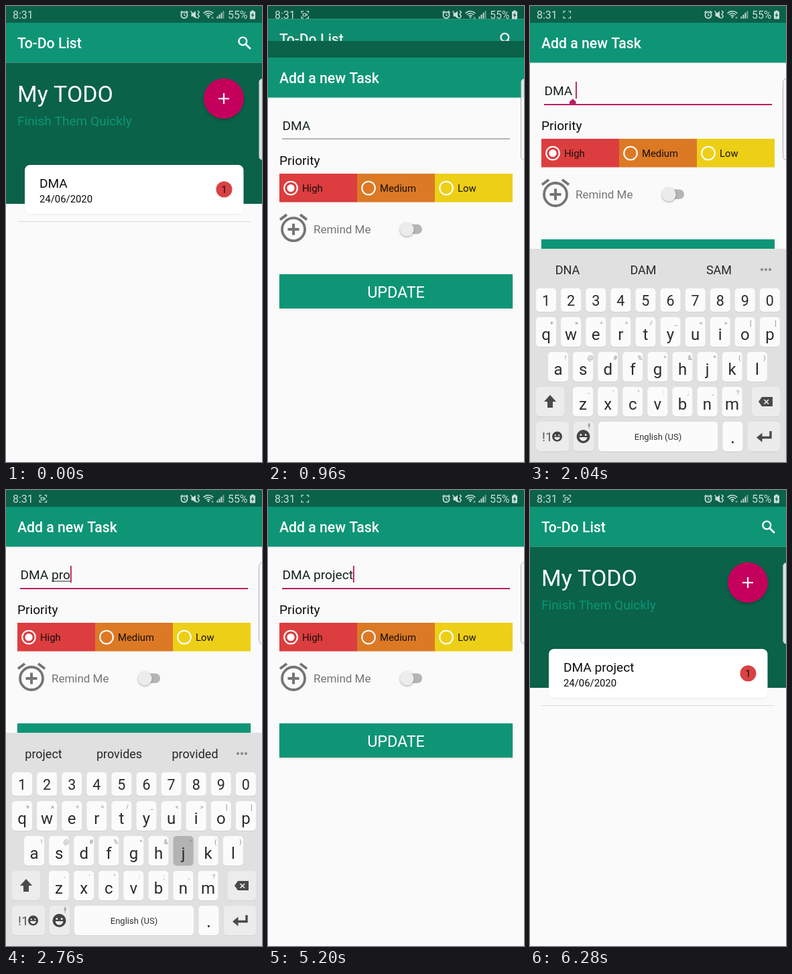
Write an HTML page with a canvas that moves like this. It is 382 by 680 pixels and loops after 6320 ms.

```html
<!DOCTYPE html>
<html lang="en">
<head>
<meta charset="utf-8">
<title>To-Do List</title>
<style>
  html, body { margin: 0; width: 100%; height: 100%; overflow: hidden; background: #fafafa; }
  canvas { display: block; width: 382px; height: 680px; }
</style>
</head>
<body>
<canvas id="stage"></canvas>
<script>
const W = 382, H = 680, LOOP = 6320, STEP = 40;
const DARK = '#0a6249', GREEN = '#0e9576', PAPER = '#fafafa', PINK = '#c5005c', ACCENT = '#b91f5f';
const canvas = document.getElementById('stage');
const dpr = window.devicePixelRatio || 1;
canvas.width = W * dpr;
canvas.height = H * dpr;
const c = canvas.getContext('2d');

// Key presses: label, press time, release time, time the character lands
const PRESSES = [
  [' ', 1960, 2040, 2000], ['p', 2120, 2240, 2200], ['r', 2280, 2400, 2360],
  ['o', 2440, 2560, 2520], ['j', 2720, 2880, 2840], ['e', 3120, 3320, 3320],
  ['c', 3400, 3520, 3480], ['t', 3560, 3640, 3640]
];
const FOCUS = 1320, COMMIT = 3840, OPEN = 780, CLOSE = 5225, SLIDE = 425;
const REC_TOGGLES = [560, 1040, 1480, 1960, 2440, 2920, 3360, 3880, 4400, 4880, 5320, 5760, 6280];
const HINTS = {
  'DMA': 'DNA DAM SAM',
  'DMA ': 'DNA DAM SAM',
  'DMA p': 'project please people',
  'DMA pr': 'project pretty present',
  'DMA pro': 'project provides provided',
  'DMA proj': 'project projects projected',
  'DMA proje': 'project projects projected',
  'DMA projec': 'project projects projected',
  'DMA project': 'projects projections projected'
};
const ROWS = [
  { y: 421, h: 35, x: 24, keys: '1234567890', alt: '' },
  { y: 464, h: 44, x: 24, keys: 'qwertyuiop', alt: '+×÷=/_<>[]' },
  { y: 516, h: 44, x: 42, keys: 'asdfghjkl', alt: '!@#%^&*()' },
  { y: 568, h: 44, x: 79, keys: 'zxcvbnm', alt: '-\'":;,?' }
];

const clamp = v => Math.max(0, Math.min(1, v));
const progress = (t, start, len) => clamp((t - start) / len);
const easeOut = p => 1 - Math.pow(1 - p, 3);
const cubic = (s, a, b, d, e) => {
  const r = 1 - s;
  return r * r * r * a + 3 * r * r * s * b + 3 * r * s * s * d + s * s * s * e;
};

// Fast start with a very long settle, made of two Bezier pieces
function slideEase(x) {
  if (x <= 0) return 0;
  if (x >= 1) return 1;
  const [px, py] = x < 1 / 6
    ? [[0, 0.05, 0.1333, 1 / 6], [0, 0, 0.06, 0.4]]
    : [[1 / 6, 0.2083, 0.25, 1], [0.4, 0.82, 1, 1]];
  let lo = 0, hi = 1;
  for (let i = 0; i < 30; i++) {
    const mid = (lo + hi) / 2;
    if (cubic(mid, ...px) < x) lo = mid; else hi = mid;
  }
  return cubic(lo, ...py);
}

function rect(x, y, w, h, color) {
  c.fillStyle = color;
  c.fillRect(x, y, w, h);
}
function round(x, y, w, h, r, color) {
  c.beginPath();
  c.roundRect(x, y, w, h, r);
  c.fillStyle = color;
  c.fill();
}
function disc(x, y, r, color) {
  c.beginPath();
  c.arc(x, y, r, 0, 7);
  c.fillStyle = color;
  c.fill();
}
function ring(x, y, r, width, color) {
  c.beginPath();
  c.arc(x, y, r, 0, 7);
  c.lineWidth = width;
  c.strokeStyle = color;
  c.stroke();
}
function trace(points) {
  c.beginPath();
  for (let i = 0; i < points.length; i += 2) c.lineTo(points[i], points[i + 1]);
}
function line(points, width, color) {
  trace(points);
  c.lineWidth = width;
  c.strokeStyle = color;
  c.stroke();
}
function poly(points, color) {
  trace(points);
  c.closePath();
  c.fillStyle = color;
  c.fill();
}
function text(str, x, y, size, color, align = 'left', weight = 400) {
  c.font = `${weight} ${size}px Roboto, sans-serif`;
  c.textAlign = align;
  c.fillStyle = color;
  c.fillText(str, x, y);
}
function withShadow(blur, dy, alpha, draw) {
  c.save();
  c.shadowColor = `rgba(0,0,0,${alpha})`;
  c.shadowBlur = blur * dpr;
  c.shadowOffsetY = dy * dpr;
  draw();
  c.restore();
}

function typed(t) {
  return 'DMA' + PRESSES.filter(p => t >= p[3]).map(p => p[0]).join('');
}
function caretOn(t) {
  const marks = [FOCUS, ...PRESSES.map(p => p[3]), 3880].filter(m => m <= t);
  return marks.length > 0 && (t - marks[marks.length - 1]) % 1000 < 500;
}

function appBar(title) {
  rect(0, 0, W, H, PAPER);
  rect(0, 84, W, 2, '#ececec');
  rect(0, 0, W, 25, DARK);
  rect(0, 25, W, 59.5, GREEN);
  text(title, 17, 63, 21.2, '#fff', 'left', 500);
}

function drawList(task) {
  appBar('To-Do List');
  ring(353.3, 52.5, 5.9, 2.4, '#fff');
  line([357.3, 56.5, 364.8, 64], 2.8, '#fff');
  rect(0, 84.5, W, 210.5, DARK);
  text('My TODO', 17, 143, 33.95, '#fff');
  text('Finish Them Quickly', 17, 178, 19.1, GREEN);
  withShadow(4, 2, 0.25, () => disc(325, 138, 30, PINK));
  rect(317, 137, 16, 2.2, '#fff');
  rect(323.9, 130, 2.2, 16, '#fff');
  withShadow(3, 1, 0.06, () => round(28, 237, 326.5, 73, 8, '#fff'));
  text(task, 50, 271, 19.1, '#0c0c0c');
  text('24/06/2020', 50, 293, 14.86, '#0c0c0c');
  disc(325.5, 273.5, 12, '#d94144');
  text('1', 325.5, 279, 15, '#1c1010', 'center');
  rect(17, 321, 348, 1, '#dcdcdc');
}

function drawField(t) {
  const value = typed(t), focused = t >= FOCUS, left = 21.5;
  text(value, left, 133, 19.1, '#14201d');
  if (!focused) {
    rect(21, 145.5, 340, 1, '#747474');
    return;
  }
  rect(21, 146, 340, 2, ACCENT);
  const end = left + c.measureText(value).width;
  if (value.length > 4 && t < COMMIT) {
    const start = left + c.measureText('DMA ').width;
    rect(start, 135.5, end - start, 1, '#222');
  }
  if (caretOn(t)) rect(end, 113, 1.8, 25, '#b5174f');
  if (t < 2080) poly([63.8, 138.5, 68.5, 142.5, 68.5, 148, 59, 148, 59, 142.5], ACCENT);
}

function drawEdit(t) {
  appBar('Add a new Task');
  drawField(t);
  text('Priority', 17, 185, 19.1, '#0c0c0c');
  [['High', '#dc3d3f'], ['Medium', '#dc7925'], ['Low', '#edcf17']].forEach(([label, color], i) => {
    const x = 17 + 116 * i;
    rect(x, 198, 116, 42.5, color);
    ring(x + 17, 219.5, 9.8, 2.1, '#fff');
    if (i === 0) disc(x + 17, 219.5, 5.6, '#fff');
    text(label, x + 34, 225, 14.86, '#17100c');
  });

  const gray = '#757575';
  ring(38, 281, 17, 3.8, gray);
  line([18, 266.5, 28, 259], 4, gray);
  line([48, 259, 58, 266.5], 4, gray);
  rect(29.5, 279, 17, 4, gray);
  rect(36, 272.5, 4, 17, gray);
  text('Remind Me', 68, 286.5, 16.98, gray);
  round(200, 273.5, 30, 14.5, 7.25, '#b5b5b5');
  withShadow(3, 1, 0.35, () => disc(207.3, 281, 10.4, '#ececec'));

  withShadow(3, 1, 0.2, () => rect(17, 348, 348, 51, GREEN));
  text('UPDATE', 191, 382.5, 23.3, '#fff', 'center');
}

function key(x, y, w, h, color) {
  round(x, y + 1, w, h, 5, '#d2d2d2');
  round(x, y, w, h, 5, color);
}
function smiley(x, y, r, face) {
  disc(x, y, r, '#444');
  disc(x - r * 0.36, y - r * 0.25, r * 0.15, face);
  disc(x + r * 0.36, y - r * 0.25, r * 0.15, face);
  c.beginPath();
  c.arc(x, y + r * 0.1, r * 0.58, 0, Math.PI);
  c.fillStyle = face;
  c.fill();
}

function drawKeyboard(t) {
  const pressed = (PRESSES.find(p => t >= p[1] && t < p[2]) || [])[0];
  const plain = '#fbfbfb', special = '#ececec', down = '#b3b3b3', ink = '#4a4a4a';
  rect(0, 362, W, 318, '#e0e0e0');
  HINTS[typed(t)].split(' ').forEach((word, i) => text(word, 56 + 113 * i, 399.5, 18, '#262626', 'center'));
  for (let i = 0; i < 3; i++) disc(346 + 6 * i, 393, 2, '#858585');

  ROWS.forEach((row, n) => [...row.keys].forEach((ch, i) => {
    const x = row.x + 37.1 * i;
    key(x - 15, row.y, 30, row.h, ch === pressed ? down : plain);
    text(ch, x, row.y + (n ? 33.5 : 25.5), n ? 24 : 21.5, '#2b2b2b', 'center');
    if (row.alt) text(row.alt[i], x + (n === 2 ? 11 : 8.5), row.y + 12, 9.5, '#8c8c8c', 'center');
  }));

  key(9, 568, 42, 44, special);
  poly([30, 580, 39, 590, 34, 590, 34, 599, 26, 599, 26, 590, 21, 590], ink);
  key(331, 568, 42, 44, special);
  poly([341, 590, 346, 583, 362, 583, 362, 597, 346, 597], ink);
  line([349.5, 587, 356, 593.5], 1.7, special);
  line([356, 587, 349.5, 593.5], 1.7, special);

  key(9, 620, 49, 44, special);
  text('!1', 18, 648.5, 19, '#555');
  smiley(40.5, 642, 7.5, special);
  key(65, 620, 30, 44, special);
  smiley(79.5, 642, 10, special);
  round(86.5, 622, 3.4, 6, 1.7, '#aaa');
  rect(87.7, 628, 1, 3, '#aaa');
  key(102, 620, 178, 44, pressed === ' ' ? down : plain);
  text('English (US)', 191, 646.5, 13, '#333', 'center');
  key(287.5, 620, 30, 44, plain);
  text('.', 302.5, 652, 27, '#2b2b2b', 'center');
  key(325, 620, 48, 44, special);
  line([359, 634, 359, 643.5, 344, 643.5], 3.4, ink);
  poly([338, 643.5, 346.5, 636.5, 346.5, 650.5], ink);
}

function drawStatus(t) {
  const ink = '#c9ded7';
  text('8:31', 10, 19, 15.9, ink);

  if (t >= 240) {
    for (const sx of [-1, 1]) for (const sy of [-1, 1]) {
      const x = 55.3 + sx * 5.2, y = 13 + sy * 5.2;
      line([x - sx * 3, y, x, y, x, y - sy * 3], 1.2, ink);
    }
    if (REC_TOGGLES.filter(m => m <= t).length % 2) {
      c.strokeStyle = ink;
      c.lineWidth = 1.1;
      c.strokeRect(52.3, 11.2, 4, 3.8);
      poly([56.5, 13, 58.8, 11.2, 58.8, 15], ink);
    }
  }

  ring(266, 13.5, 4.6, 1.8, ink);
  line([260.3, 10, 263.2, 7.4], 1.6, ink);
  line([268.8, 7.4, 271.7, 10], 1.6, ink);
  line([266, 10.8, 266, 13.8, 268, 15], 1.2, ink);

  poly([276.5, 10.8, 279, 10.8, 283, 7.5, 283, 18.5, 279, 15.4, 276.5, 15.4], ink);
  line([275.5, 7.5, 285, 18.5], 1.3, ink);
  line([286, 7, 288.4, 9.4, 286, 12.2, 288.4, 15, 286, 18.5], 1.4, ink);

  for (const r of [3.4, 6.6, 9.8]) {
    c.beginPath();
    c.arc(302, 17.5, r, -Math.PI * 0.77, -Math.PI * 0.23);
    c.lineWidth = 1.5;
    c.strokeStyle = ink;
    c.stroke();
  }
  disc(302, 16.8, 1.3, ink);
  poly([306, 18.5, 310, 18.5, 308, 15.5], '#8fb5a8');

  for (let i = 0; i < 4; i++) {
    const h = 3 + 2.8 * i;
    rect(314.5 + 3 * i, 18.7 - h, 1.9, h, i < 3 ? ink : '#7ea699');
  }
  text('55%', 331, 19, 15.9, ink);
  round(364, 8, 8, 11.5, 1, ink);
  rect(366.2, 6.6, 3.6, 1.6, ink);
  poly([368.8, 9.3, 365.6, 14.2, 367.8, 14.2, 367, 18, 370.5, 12.9, 368.3, 12.9], DARK);
}

function drawEdgeHandle() {
  c.beginPath();
  c.roundRect(377.5, 108.5, 20, 121, 5);
  c.fillStyle = 'rgba(246,247,247,0.86)';
  c.fill();
  c.lineWidth = 1;
  c.strokeStyle = 'rgba(150,155,153,0.75)';
  c.stroke();
}

function shifted(y, draw) {
  c.save();
  c.translate(0, y);
  draw();
  c.restore();
}

function render(t) {
  c.setTransform(dpr, 0, 0, dpr, 0, 0);
  rect(0, 0, W, H, PAPER);

  const opening = t >= 840 ? progress(t, OPEN, SLIDE) : 0;
  const closing = t >= 5280 ? progress(t, CLOSE, SLIDE) : 0;
  const editY = H * (1 - slideEase(opening) + slideEase(closing));
  const back = opening - closing;

  if (editY > 0) {
    shifted(-0.02 * H * back, () => drawList(closing ? 'DMA project' : 'DMA'));
    rect(0, 0, W, H, `rgba(0,0,0,${0.16 * back})`);
  }
  if (editY < H) shifted(editY, () => drawEdit(t));

  const keys = easeOut(progress(t, 1480, 400)) - Math.pow(progress(t, 3960, 240), 1.6);
  if (keys > 0) shifted(318 * (1 - keys), () => drawKeyboard(t));

  drawStatus(t);
  drawEdgeHandle();
}

const origin = performance.now();
function tick() {
  const t = (performance.now() - origin) % LOOP;
  render(Math.floor(t / STEP) * STEP);
  requestAnimationFrame(tick);
}
tick();
</script>
</body>
</html>
```
